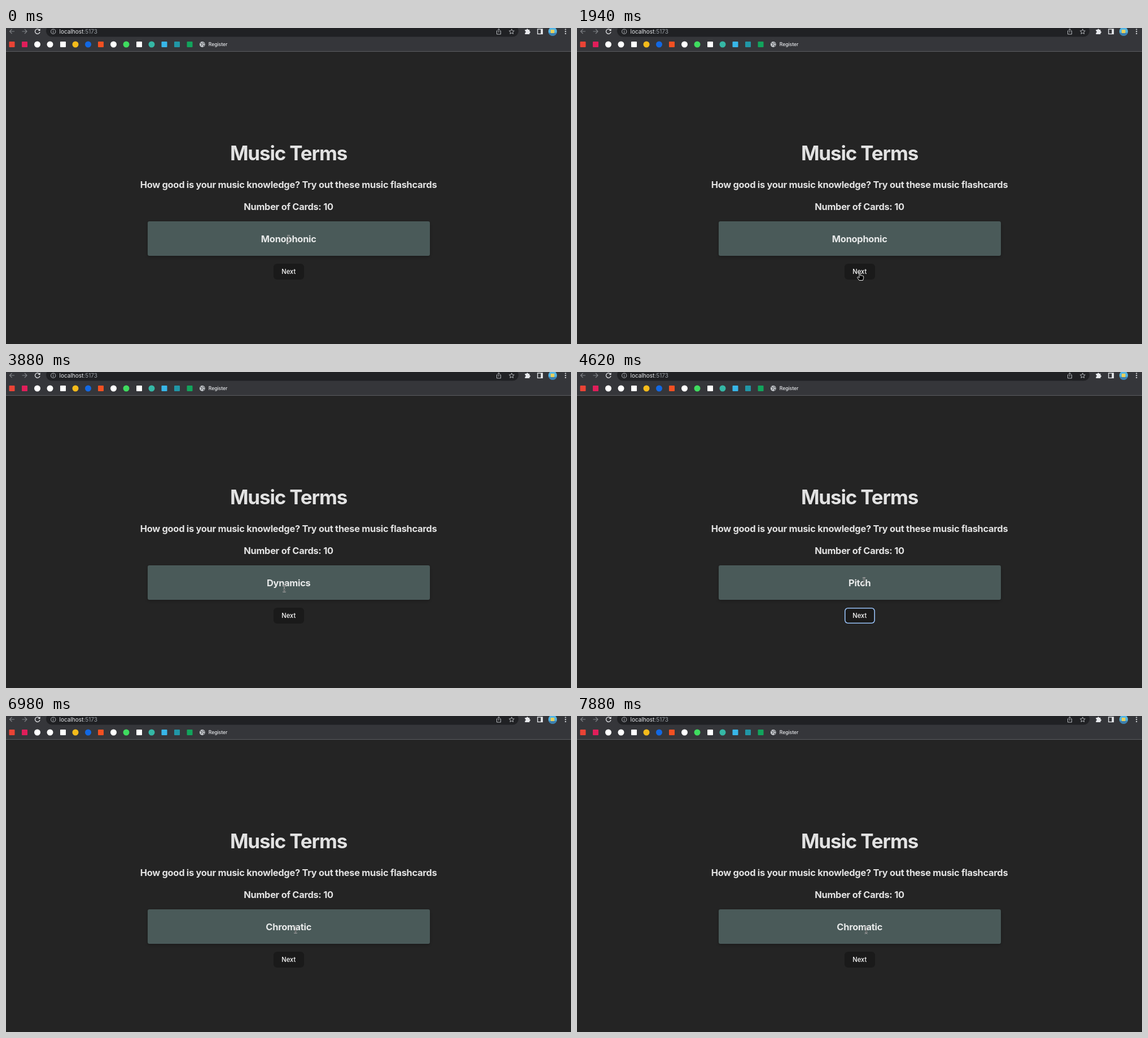
Recreate the animation shown at these times as an HTML page. Size 1001 px wide and 559 px high, loop 8 s.

```html
<!DOCTYPE html>
<html lang="en">
<head>
<meta charset="utf-8">
<title>Music Terms</title>
<style>
  html, body { margin: 0; width: 100%; height: 100%; overflow: hidden; background: #242424; }
  body {
    position: relative;
    font-family: Inter, "Open Sans", sans-serif;
    font-optical-sizing: none;
    color: rgba(255, 255, 255, .87);
  }
  svg { position: absolute; left: 0; top: 0; overflow: visible; }

  .page { position: absolute; left: 0; top: 0; width: 1001px; height: 559px; }
  .page > * { position: absolute; margin: 0; left: 0; width: 1001px; text-align: center; white-space: nowrap; }
  h1 { top: 201px; font: 700 35px/40px Inter, sans-serif; letter-spacing: -1.15px; }
  h3, .card { font: 700 16.4px/25.4px Inter, sans-serif; letter-spacing: -.27px; }
  .lead { top: 264.9px; }
  .count { top: 304.1px; }
  .page > .card {
    left: 250.5px; top: 342.4px; width: 500.5px; padding: 18.3px 0 16.5px; border-radius: 3px;
    background: #4a5a59; box-shadow: 0 2px 4px rgba(0, 0, 0, .25);
    white-space: pre-line;
  }
  .page > .next {
    left: 474px; top: 417px; width: 53.5px; height: 28px; border-radius: 6px;
    background: #1a1a1a; font: 500 11.2px/28px Inter, sans-serif; color: #fff;
  }
  .ring .next { box-shadow: inset 0 0 0 1.6px #98c1f7; }
  .wide { top: -12.7px; }
  .wide > .card { left: 65px; width: 871px; }
  .wide > .next { top: 442.5px; }
</style>
</head>
<body>
<svg id="bar" width="1001" height="42" fill="none">
  <rect width="1001" height="42" fill="#35363a"/>
  <rect y="41" width="1001" height="1" fill="#5b5d60"/>
  <rect x="71" y="-5" width="837" height="20.5" rx="10.2" fill="#202124"/>
  <g stroke="#7f8185" stroke-width="1.2">
    <path d="M15 6H6.5M10.5 2L6.5 6l4 4"/>
    <path d="M28.5 6H37M33 2l4 4-4 4"/>
  </g>
  <g stroke="#e4e5e8" stroke-width="1.3">
    <path d="M59.3 3.6a4.3 4.3 0 1 0 .7 3.4"/>
    <path d="M60.6 1v4h-4z" fill="#e4e5e8" stroke="none"/>
  </g>
  <g stroke="#b4b7bb">
    <circle cx="83.7" cy="6.2" r="4.1"/>
    <path d="M83.7 5.6v3M83.7 3.6v1.1"/>
    <path d="M871 5h-1.5v6h7V5H875M873 8V1.5M871 3.3l2-2 2 2"/>
    <path d="M895.8 1.8l1.3 3 3.2.3-2.4 2.1.7 3.2-2.8-1.7-2.8 1.7.7-3.2-2.4-2.1 3.2-.3z"/>
  </g>
  <g fill="#e8eaed">
    <path d="M919.5 3h2.6a1.5 1.5 0 0 1 3 0h2.4v2.7a1.5 1.5 0 0 1 0 3V11h-8V8.4a1.4 1.4 0 0 0 0-2.8z"/>
    <path d="M947.5 2h3v8.5h-3z"/>
    <circle cx="991.3" cy="2.5" r="1.1"/><circle cx="991.3" cy="6.2" r="1.1"/><circle cx="991.3" cy="9.9" r="1.1"/>
  </g>
  <rect x="941.8" y="2" width="8.7" height="8.5" stroke="#e8eaed" stroke-width="1.3"/>
  <circle cx="968.5" cy="6" r="7.7" fill="#55b4e2"/>
  <path d="M961.2 8.5h14.6a7.7 7.7 0 0 1-14.6 0z" fill="#3b7fae"/>
  <path d="M965 3h6.5v6H965z" fill="#e8d05b"/>
  <g font-family="Inter, sans-serif" fill="#e8eaed">
    <text x="94.6" y="9.8" font-size="10">localhost<tspan fill="#9aa0a6">:5173</tspan></text>
    <text x="358.8" y="32" font-size="8.5" font-weight="500">Register</text>
  </g>
  <circle cx="347.8" cy="29" r="4.9" fill="#c6c9cd"/>
  <path d="M344 26.5l3 1 .5 2-2 1.5M348.5 25l1 2 2.3.6M349 30l2 .5-1.5 2.4" stroke="#55585c" stroke-width="1.1"/>
</svg>

<div class="page" id="page">
  <h1>Music Terms</h1>
  <h3 class="lead">How good is your music knowledge? Try out these music flashcards</h3>
  <h3 class="count">Number of Cards: 10</h3>
  <div class="card" id="card"></div>
  <div class="next">Next</div>
</div>

<svg width="1001" height="559">
  <defs>
    <path id="beam" d="M-2.6 -6Q-.4 -6 0 -4.8Q.4 -6 2.6 -6M0 -4.8V4.8M-2.6 6Q-.4 6 0 4.8Q.4 6 2.6 6M-1.4 2.2H1.4"/>
  </defs>
  <g id="cursor" fill="none" stroke-linejoin="round">
    <g data-shape="beam">
      <use href="#beam" stroke="#d9dddd" stroke-width="2"/>
      <use href="#beam" stroke="#222" stroke-width=".9"/>
    </g>
    <path data-shape="arrow" d="M0 0V11.2L2.6 8.8 4.3 12.6 6 11.8 4.4 8.2H8z" fill="#000" stroke="#fff" stroke-width=".9"/>
    <path data-shape="hand" d="M-1 .6Q0 -.6 1 .6V5Q2.3 4 3 5.2 4.4 4.4 5 5.7 6.6 5.2 6.7 6.8V9.5L5.4 13.5H-1L-4.4 8.6Q-4.2 6.8 -2.6 7.6L-1 9z" fill="#000" stroke="#fff" stroke-width=".9"/>
  </g>
</svg>

<script>
const LOOP = 8000;

// Bookmark marks: [x, colour, round]
[
  [10.5, '#ea4335'], [33, '#e01e5a'], [55.5, '#fff', 1], [78, '#fff', 1], [101, '#fff'],
  [123, '#f5bb1b', 1], [145.5, '#1268e3', 1], [168, '#f25022'], [190.5, '#fff', 1],
  [213, '#3fdc5f', 1], [236, '#fff'], [258, '#35b8a6', 1], [280.5, '#38b6e8'],
  [303, '#2196a6'], [325.5, '#12a45c']
].forEach(([x, fill, round]) => {
  const mark = document.createElementNS('http://www.w3.org/2000/svg', 'rect');
  const size = round ? 11 : 10;
  const attrs = { x: x - size / 2, y: 29 - size / 2, width: size, height: size, rx: round ? size / 2 : 1, fill };
  for (const key in attrs) mark.setAttribute(key, attrs[key]);
  bar.append(mark);
});

const cards = [
  ['Monophonic', 'A single melody line/tune played by many people'],
  ['Dynamics', 'how loud or soft the music is'],
  ['Pitch', 'How high or low the note is'],
  ['Chromatic', 'motion by half steps; also describes harmony or melody that employs some of the sequential 12 pitches\n(semi-tones) in an octave - Chromatic notes are notes not in the key']
];

const move = (x, y, shape = 'beam') => ({ x, y, shape });
const flip = { side: 1 }, back = { side: 0 };
const press = { ring: true }, blur = { ring: false };
const show = n => ({ n, side: 0 });

// Each step changes part of the state at its time
const steps = [
  [0, { ...show(0), ...blur, ...move(500.6, 373) }],
  [300, flip],
  [890, move(501.4, 373)],
  [1190, back],
  [1340, move(501, 380)],
  [1490, move(501, 392, 'arrow')],
  [1640, move(501, 409, 'arrow')],
  [1790, move(501, 427, 'hand')],
  [1940, move(501, 433, 'hand')],
  [2090, press],
  [2240, show(1)],
  [2540, move(500, 426, 'hand')],
  [2690, move(493, 383)],
  [2840, blur],
  [2990, flip],
  [3740, back],
  [3890, move(496, 399, 'arrow')],
  [4040, move(502, 429, 'hand')],
  [4190, press],
  [4320, show(2)],
  [4470, move(506, 396, 'arrow')],
  [4620, move(508.5, 370)],
  [4770, move(508.5, 370.5)],
  [4920, blur],
  [5070, flip],
  [5520, move(508.5, 370.2)],
  [5810, back],
  [5960, move(508, 391, 'arrow')],
  [6110, move(506, 426, 'hand')],
  [6250, move(505, 440, 'hand')],
  [6400, press],
  [6540, show(3)],
  [6690, move(510, 403, 'arrow')],
  [6840, move(513, 378)],
  [6980, blur],
  [7130, flip],
  [7280, move(513, 377)],
  [7880, { ...back, ...move(512.3, 378.5) }]
];

const shapes = cursor.querySelectorAll('[data-shape]');
let last = -1;

function draw(now) {
  const t = now % LOOP;
  const past = steps.filter(([at]) => at <= t);
  if (past.length !== last) {
    last = past.length;
    const s = Object.assign({}, ...past.map(step => step[1]));
    const text = cards[s.n][s.side];
    card.textContent = text;
    page.classList.toggle('wide', text.includes('\n'));
    page.classList.toggle('ring', s.ring);
    cursor.setAttribute('transform', `translate(${s.x} ${s.y})`);
    shapes.forEach(el => el.style.display = el.dataset.shape === s.shape ? '' : 'none');
  }
  requestAnimationFrame(draw);
}
draw(0);
</script>
</body>
</html>
```
